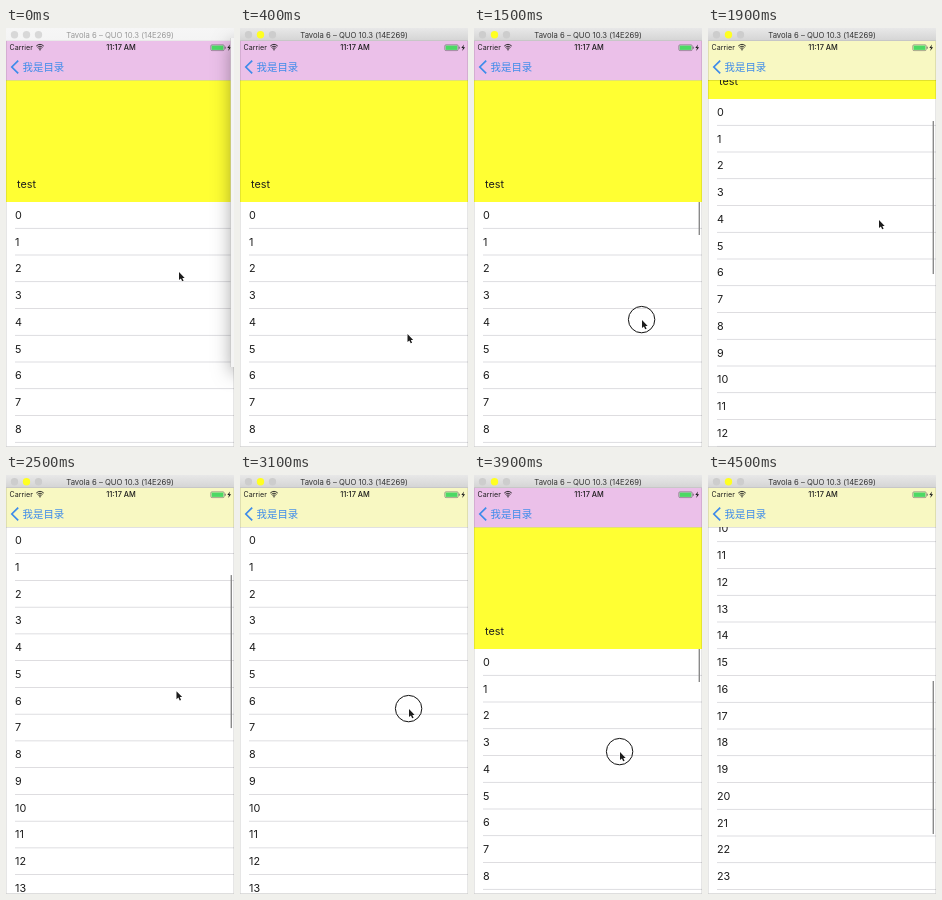
An HTML page with a canvas for the animation above (4.6 s loop, 228 by 419 pixels).

```html
<!DOCTYPE html>
<html lang="zh">
<head>
<meta charset="utf-8">
<title>Sticky header list</title>
<style>
html, body { margin: 0; width: 100%; height: 100%; overflow: hidden; background: #fff; }
canvas { display: block; width: 228px; height: 419px; }
</style>
</head>
<body>
<canvas></canvas>
<script>
const W = 228, H = 419, LOOP = 4600, STEP = 100;
const ROW = 26.75, HEADER = 121.6, NAV_BOTTOM = 52, BAR_FADE = 450;
const SANS = 'Inter, "Noto Sans CJK SC", "Noto Sans CJK", sans-serif';
const INK = '#1c1c1c', BLUE = '#3d8bea';

const canvas = document.querySelector('canvas');
const ctx = canvas.getContext('2d');
const dpr = window.devicePixelRatio || 1;
canvas.width = W * dpr;
canvas.height = H * dpr;

// Turning points of the hand: time, scroll, cursor x, cursor y
const stops = [
  [0, 0, 173, 244],
  [800, 0, 162, 368],
  [1150, 118, 166, 250],
  [1500, 0, 168, 292],
  [1900, 103, 171, 192],
  [2200, HEADER, 171, 210],
  [3100, HEADER, 169, 234],
  [3500, 0, 160, 356],
  [3900, 0, 146, 277],
  [4500, 401, 150, -124],
];

function pose(t) {
  const i = stops.findIndex(s => s[0] > t);
  if (i < 0) return stops.at(-1).slice(1);
  if (i === 0) return stops[0].slice(1);
  const [a, b] = [stops[i - 1], stops[i]];
  const p = (t - a[0]) / (b[0] - a[0]);
  const eased = p * p * (3 - 2 * p);
  return a.map((v, n) => v + (b[n] - v) * eased).slice(1);
}

const isPressed = t => (t >= 700 && t < 1800) || (t >= 3100 && t < 4200);

function rect(color, x, y, w, h) {
  ctx.fillStyle = color;
  ctx.fillRect(x, y, w, h);
}

function disc(color, x, y, r) {
  ctx.fillStyle = color;
  ctx.beginPath();
  ctx.arc(x, y, r, 0, 7);
  ctx.fill();
}

function ring(color, width, x, y, r, from = 0, to = 7) {
  ctx.strokeStyle = color;
  ctx.lineWidth = width;
  ctx.beginPath();
  ctx.arc(x, y, r, from, to);
  ctx.stroke();
}

function text(str, x, y, size, color = INK, align = 'left', weight = 400) {
  ctx.font = `${weight} ${size}px ${SANS}`;
  ctx.textAlign = align;
  ctx.fillStyle = color;
  ctx.fillText(str, x, y);
}

function drawList(scroll, showBar) {
  const top = NAV_BOTTOM + HEADER - scroll;
  for (let i = 0; top + i * ROW < H; i++) {
    const y = top + i * ROW;
    text(i, 9, y + 17.2, 10.8);
    rect('#c8c7cc', 9, y + ROW - 0.4, W - 9, 0.6);
  }
  if (showBar) rect('#8a8a8a', 224.6, 54 + scroll * 0.379, 1.4, 153);
  const bottom = Math.round(top);
  rect('#ffff33', 0, bottom - HEADER, W, HEADER);
  text('test', 11, bottom - 14.2, 10.8);
}

function drawNav(scroll) {
  const p = Math.min(1, scroll / 100);
  const mix = (a, b) => a + (b - a) * p;
  rect(`rgb(${mix(235, 248)},${mix(192, 248)},${mix(233, 194)})`, 0, 13, W, NAV_BOTTOM - 13);
  rect('rgba(0,0,0,.2)', 0, NAV_BOTTOM, W, 0.6);

  text('Carrier', 3.6, 22.3, 7.1);
  text('11:17 AM', 115, 22.3, 7.4, INK, 'center', 500);
  for (let r = 2.2; r < 6; r += 1.7) ring(INK, 0.9, 34, 22.2, r, -2.3, -0.84);
  disc(INK, 34, 21.8, 0.7);

  ctx.lineWidth = 0.5;
  ctx.strokeStyle = '#555';
  ctx.beginPath();
  ctx.roundRect(204.8, 16.8, 13.4, 5.8, 1.2);
  ctx.stroke();
  rect('#4cd964', 205.6, 17.5, 11.8, 4.4);
  rect('#555', 218.8, 18.7, 0.8, 2);
  ctx.fillStyle = INK;
  ctx.fill(new Path2D('M224 16.5l-2.7 3.6h1.7l-.8 2.9 2.9-3.8h-1.8z'));

  ctx.strokeStyle = BLUE;
  ctx.lineWidth = 1.7;
  ctx.stroke(new Path2D('M12.2 32.6L5.8 39l6.4 6.4'));
  text('我是目录', 16.6, 42.9, 10.4, BLUE);
}

function drawTitle(active) {
  const shade = ctx.createLinearGradient(0, 0, 0, 13);
  shade.addColorStop(0, active ? '#e8e8e8' : '#f6f6f6');
  shade.addColorStop(1, active ? '#d4d4d4' : '#f4f4f4');
  rect(shade, 0, 0, W, 13);
  rect(active ? '#b8b8b8' : '#dcdcdc', 0, 12.5, W, 0.5);
  for (let i = 0; i < 3; i++) {
    disc(active && i === 1 ? '#ffff22' : active ? '#cdcdcd' : '#d8d8d8', 8.5 + 12 * i, 6.8, 3.7);
  }
  text('Tavola 6 – QUO 10.3 (14E269)', 114, 9.8, 7.7, active ? '#333' : '#999', 'center');
}

function drawSideWindow() {
  ctx.save();
  ctx.shadowColor = 'rgba(0,0,0,.35)';
  ctx.shadowBlur = 18 * dpr;
  ctx.shadowOffsetY = 5 * dpr;
  rect('#f4f4f4', 225, 10, 30, 329);
  ctx.restore();
  rect('#c4c4c4', 224.5, 10, 0.5, 329);
}

function drawCursor(x, y, pressed) {
  if (pressed) ring('#111', 1, x - 0.4, y - 0.4, 13.2);
  const arrow = new Path2D('M0 0v8l1.9-1.6 1.3 2.9 1.4-.6-1.3-2.8h2.4z');
  ctx.save();
  ctx.translate(x, y);
  ctx.lineWidth = 1;
  ctx.strokeStyle = '#fff';
  ctx.stroke(arrow);
  ctx.fillStyle = INK;
  ctx.fill(arrow);
  ctx.restore();
}

function draw(t) {
  const [scroll, x, y] = pose(t);
  const showBar = Math.abs(scroll - pose(t - BAR_FADE)[0]) > 0.1 || (isPressed(t) && scroll > 0 && scroll < HEADER);
  ctx.setTransform(dpr, 0, 0, dpr, 0, 0);
  rect('#fff', 0, 0, W, H);
  drawList(scroll, showBar);
  drawNav(scroll);
  drawTitle(t >= 200);
  for (const edge of [0, W - 0.5]) rect('rgba(0,0,0,.2)', edge, 13, 0.5, H);
  rect('#c8c8c8', 0, H - 0.6, W, 0.6);
  if (t < 200) drawSideWindow();
  drawCursor(x, y, isPressed(t));
}

const start = performance.now();
function tick() {
  const t = (performance.now() - start) % LOOP;
  draw(Math.floor(t / STEP) * STEP);
  requestAnimationFrame(tick);
}
tick();
</script>
</body>
</html>
```
